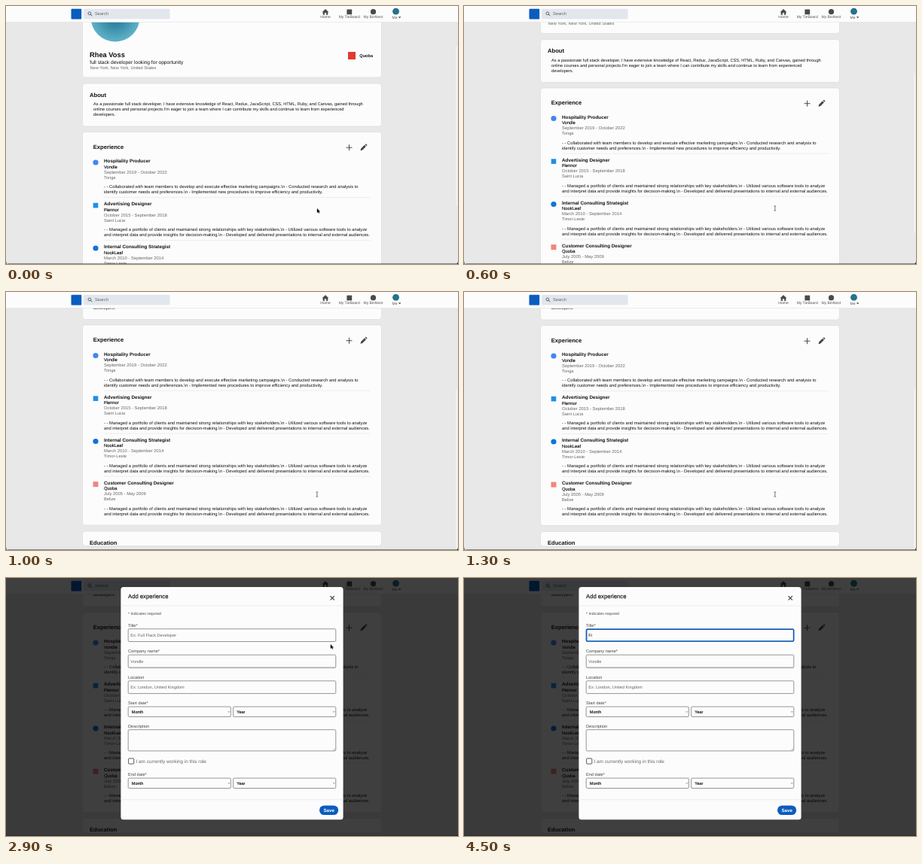
These frames come from a looping animation (600 by 343 pixels, 5 s). An HTML page:

```html
<!DOCTYPE html>
<html lang="en">
<head>
<meta charset="utf-8">
<title>Profile page</title>
<style>
  @property --s { syntax: "<number>"; inherits: true; initial-value: 0; }
  html, body { margin: 0; width: 100%; height: 100%; overflow: hidden; background: #e8e8e8; }
  svg { display: block; width: 600px; height: 343px; animation: scroll 5s step-end infinite; }
  text {
    font-family: "Liberation Sans", Arial, sans-serif;
    text-rendering: geometricPrecision;
    fill: #111;
    white-space: pre;
  }
  .b { font-weight: 700; }
  .m { stroke: #111; stroke-width: .14; }
  .g { fill: #666; }
  .l { fill: #444; }
  .c { text-anchor: middle; fill: #555; }
  .w { fill: #fff; }
  .card { fill: #fcfcfc; stroke: #d9d9d9; stroke-width: .6; }
  .rule { stroke: #e2e2e2; stroke-width: .6; }
  .field { fill: #fcfcfc; stroke: #6a6a6a; stroke-width: .7; }
  .line { fill: none; stroke: #4a4a4a; }
  #page { transform: translateY(calc(var(--s) * -1px)); }
  #thumb { transform: translateY(calc(var(--s) * .62px)); }
  #pointer { animation: move 5s step-end infinite; }
  #caret { animation: caret 5s step-end infinite; }

  @keyframes scroll {
    0% { --s: 0 } 2% { --s: 18 } 4% { --s: 33 } 6% { --s: 43 } 8% { --s: 48 }
    12% { --s: 58.5 } 14% { --s: 80 } 16% { --s: 101 } 18% { --s: 115 }
    20% { --s: 123.5 } 22% { --s: 124 } 24% { --s: 123.5 } 26% { --s: 123 }
    28%, 100% { --s: 122 }
  }
  @keyframes move {
    0% { transform: translate(412.8px, 269px) }
    34% { transform: translate(414px, 258px) }
    36% { transform: translate(424px, 215px) }
    38% { transform: translate(439px, 138px) }
    40% { transform: translate(452px, 72px) }
    42% { transform: translate(455px, 66px) }
    52% { transform: translate(452px, 70px) }
    54% { transform: translate(444px, 78px) }
    56% { transform: translate(435px, 85px) }
    58% { transform: translate(430.7px, 88px) }
    64% { transform: translate(420px, 87px) }
    68% { transform: translate(370px, 82px) }
    70% { transform: translate(300px, 79px) }
    72% { transform: translate(245px, 77px) }
    74%, 100% { transform: translate(215px, 76px) }
  }
  @keyframes caret {
    0% { transform: translateX(165.4px) }
    84% { transform: translateX(168.9px) }
    90%, 100% { transform: translateX(170.2px) }
  }
</style>
</head>
<body>
<script>
const text = (x, y, size, str, cls = "") =>
  `<text x="${x}" y="${y}" font-size="${size}" class="${cls}">${str}</text>`;
const rect = (x, y, w, h, r = 0, attrs = "") =>
  `<rect x="${x}" y="${y}" width="${w}" height="${h}" rx="${r}" ${attrs}/>`;
const dot = (x, y, r, fill, attrs = "") =>
  `<circle cx="${x}" cy="${y}" r="${r}" fill="${fill}" ${attrs}/>`;
const path = (d, attrs = "") => `<path d="${d}" ${attrs}/>`;
const card = (top, bottom) => rect(101.5, top, 397, bottom - top, 4, 'class="card"');

// Visible only inside the given [from, to) ranges, in percent of the loop
const windows = {
  arrow: [[0, 6], [36, 40], [52, 66]],
  beam: [[6, 36], [66, 84]],
  hand: [[40, 52]],
  hover: [[40, 50]],
  modal: [[50, 100]],
  hint: [[50, 84]],
  focus: [[78, 100]],
  typedF: [[84, 100]],
  typedI: [[90, 100]]
};
const css = Object.entries(windows).map(([name, ranges]) => {
  const keys = ranges.map(([a, b]) =>
    `${a}% { visibility: visible } ${b}% { visibility: ${b < 100 ? "hidden" : "visible"} }`).join(" ");
  const start = ranges[0][0] ? "0% { visibility: hidden }" : "";
  return `@keyframes ${name} { ${start} ${keys} }
    .${name} { visibility: hidden; animation: ${name} 5s step-end infinite; }`;
}).join("\n");
document.head.insertAdjacentHTML("beforeend", `<style>${css}</style>`);

const managed = [
  "- - Managed a portfolio of clients and maintained strong relationships with key stakeholders.\\n - Utilized various software tools to analyze",
  "and interpret data and provide insights for decision-making.\\n - Developed and delivered presentations to internal and external audiences."
];
const jobs = [
  ["Hospitality Producer", "Vondle", "September 2019 - October 2022", "Tonga", [
    "- - Collaborated with team members to develop and execute effective marketing campaigns.\\n - Conducted research and analysis to",
    "identify customer needs and preferences.\\n - Implemented new procedures to improve efficiency and productivity."],
    dot(119, 208, 3.6, "#4285f4")],
  ["Advertising Designer", "Flennor", "October 2015 - September 2018", "Saint Lucia", managed,
    rect(115.7, 204.8, 6.6, 6.6, 0, 'fill="#1d8fe8"')],
  ["Internal Consulting Strategist", "NookLeaf", "March 2010 - September 2014", "Timor-Leste", managed,
    dot(119, 208, 3.6, "#1072dd")],
  ["Customer Consulting Designer", "Quoba", "July 2005 - May 2009", "Belize", managed,
    rect(115.5, 204.6, 7, 7, 0, 'fill="#ee8680"')]
];
const job = ([title, firm, dates, place, lines, mark], i) => `<g transform="translate(0 ${i * 57})">
  ${mark}
  ${text(130, 208.3, 6.3, title, "b")}
  ${text(130, 215.6, 5.85, firm, "m")}
  ${text(130, 222.5, 5.85, dates, "g")}
  ${text(130, 229.5, 5.7, place, "g")}
  ${lines.map((s, k) => text(130, 242 + 7 * k, 5.8, s)).join("")}
  ${i < 3 ? path("M130 254.6H484", 'class="rule"') : ""}
</g>`;

const about = [
  "As a passionate full stack developer, I have extensive knowledge of React, Redux, JavaScript, CSS, HTML, Ruby, and Canvas, gained through",
  "online courses and personal projects.I'm eager to join a team where I can contribute my skills and continue to learn from experienced",
  "developers."
];
const page = `<g id="page">
  ${card(-60, 95)}
  ${dot(145, 15, 32.5, "url(#sea)")}
  ${text(111, 68, 9.3, "Rhea Voss", "b")}
  ${text(111.3, 76.7, 6.65, "full stack developer looking for opportunity")}
  ${text(111.5, 83.6, 5.65, "New York, New York, United States", "g")}
  ${rect(454, 61, 10, 10, 0, 'fill="#df3b30"')}
  ${text(469.3, 68.2, 5.6, "Quoba", "b")}
  ${card(103, 160)}
  ${text(111, 120.7, 7.65, "About", "b")}
  ${about.map((s, k) => text(116, 132 + 7 * k, 5.67, s)).join("")}
  ${card(167.5, 433.5)}
  ${text(115.8, 189.7, 7.6, "Experience", "b")}
  ${dot(455.5, 188, 9.6, "#dddddd", 'class="hover"')}
  ${path("M451.5 188.2h8M455.5 184.2v8", 'class="line"')}
  ${path("M-4 4l.7-2.8L1.4-3.4l2 2L-1.3 3.3zM2.1-4l.7-.7q.5-.4.9 0l1 1q.4.4 0 .9l-.7.7z",
    'transform="translate(474.5 188.2)" fill="#444"')}
  ${jobs.map(job).join("")}
  ${card(441.5, 461)}
  ${text(111, 459, 7.55, "Education", "b")}
</g>`;

const header = `${rect(0, 0, 600, 21.5, 0, 'fill="#fcfcfc"')}
  ${path("M0 21.5H600", 'stroke="#dcdcdc" stroke-width=".5"')}
  ${rect(86.5, 3.7, 13.7, 13.7, 1, 'fill="#0a5cbf"')}
  ${rect(103, 3.7, 114.5, 13.6, 1.5, 'fill="#e1e7ed"')}
  ${path("M112.4 11.2l2 2", 'class="line"')}
  <circle cx="110.9" cy="9.8" r="1.9" class="line" stroke-width=".8"/>
  ${text(118, 12.4, 5.7, "Search", "g")}
  ${path("M419.6 8.3L424 4l4.4 4.3h-1.1V11.7h-2.2V8.9h-2.2v2.8h-2.2V8.3z", 'fill="#4a4a4a"')}
  ${rect(452.4, 4.4, 6.8, 6.8, .5, 'fill="#4a4a4a"')}
  ${dot(487.5, 7.7, 3.6, "#4a4a4a")}
  ${dot(517.5, 7.2, 4.4, "#24728c")}
  ${text(424, 16.2, 5, "Home", "c")}
  ${text(455.7, 16.2, 5, "My TieBoard", "c")}
  ${text(487.3, 16.2, 5, "My BinNest", "c")}
  ${text(516, 16.8, 5, "Me", "c")}
  ${path("M520.8 14.2h3.6l-1.8 2z", 'fill="#444"')}`;

const field = (y, h) => rect(162.2, y, 275.6, h, 1.4, 'class="field"');
const select = (x, y, label) => `${rect(x, y, 136.2, 13.4, 1.4, 'class="field"')}
  ${text(x + 4.6, y + 8.7, 5.55, label, "m")}
  ${path(`M${x + 132.6} ${y + 6.1}l1.2 1.3 1.2-1.3`, 'class="line" stroke-width=".6"')}`;
const dates = y => select(162.2, y, "Month") + select(301.6, y, "Year");
const label = (y, str) => text(162, y, 5.65, str, "l");

const modal = `<g class="modal">
  ${rect(0, 0, 600, 343, 0, 'fill="#000" fill-opacity=".75"')}
  ${rect(152.4, 12, 295.2, 309.2, 3.5, 'fill="#fcfcfc"')}
  ${text(162, 27.4, 7.7, "Add experience", "m")}
  ${path("M430.5 24l5.4 5.4M435.9 24l-5.4 5.4", 'class="line" stroke-width="1.2"')}
  ${path("M152.4 37H447.6M152.4 294.7H447.6", 'class="rule"')}
  ${text(162, 48.7, 5.1, "* Indicates required", "l")}
  ${label(64.7, "Title*")}
  ${field(67.7, 16.8)}
  ${rect(162.6, 68.2, 275, 15.8, 1.2, 'class="focus" fill="#fcfcfc" stroke="#0a5cbf" stroke-width="1.6"')}
  ${text(165.2, 78, 5.63, "Ex: Full Flack Developer", "g hint")}
  ${text(165.2, 78, 5.63, 'F<tspan class="typedI">i</tspan>', "typedF")}
  <path id="caret" class="focus" d="M0 72.8v6.6" stroke="#111" stroke-width=".6"/>
  ${label(99.3, "Company name*")}
  ${rect(162.4, 103, 275.6, 17.2, 1.6, 'fill="#d8d8d8"')}
  ${field(102.2, 16.8)}
  ${text(165.2, 112.6, 5.63, "Vondle", "g")}
  ${label(133.8, "Location")}
  ${field(136.8, 16.8)}
  ${text(165.2, 147.2, 5.63, "Ex: London, United Kingdom", "g")}
  ${label(168.2, "Start date*")}
  ${dates(171.1)}
  ${label(198.8, "Description")}
  ${field(201.7, 28.2)}
  ${path("M434.4 229l2.6-2.6M436 229l1-1", 'class="line" stroke-width=".4"')}
  ${rect(162.6, 239.9, 7.2, 7.2, .8, 'class="line" stroke-width=".9"')}
  ${text(172.5, 245.8, 6.4, "I am currently working in this role", "g")}
  ${label(263.3, "End date*")}
  ${dates(266.1)}
  ${rect(416, 302.4, 25.2, 12.6, 6.3, 'fill="#0a5cbf"')}
  ${text(421.4, 311, 6.2, "Save", "b w")}
</g>`;

const pointer = `<g id="pointer">
  ${path("M0 0v6l1.4-1.2.9 2 1-.4-.9-2h1.8z",
    'class="arrow" fill="#000" stroke="#fff" stroke-width=".5" paint-order="stroke"')}
  ${path("M-1.3-3.3Q0-3.3 0-2.5V2.5Q0 3.3-1.3 3.3M1.3-3.3Q0-3.3 0-2.5M0 2.5Q0 3.3 1.3 3.3",
    'class="beam" fill="none" stroke="#333" stroke-width=".7"')}
  ${path("M-1.2 1V-2.6q.6-1 1.2 0V-.4l2.4.6q.7.2.6 1L2.5 4H-.8L-2.9 1.4q0-1 1-.8z",
    'class="hand" fill="#fff" stroke="#222" stroke-width=".6"')}
</g>`;

document.body.innerHTML = `<svg viewBox="0 0 600 343">
  <defs><radialGradient id="sea">
    <stop offset=".2" stop-color="#2a7f9b"/><stop offset="1" stop-color="#5fb2c8"/>
  </radialGradient></defs>
  ${rect(0, 0, 600, 343, 0, 'fill="#e8e8e8"')}
  ${page}
  ${rect(597, 53, 2.4, 213, 1.2, 'id="thumb" fill="#f1f1f1"')}
  ${header}
  ${modal}
  ${path("M0 339v4h4A4 4 0 0 1 0 339M600 339v4h-4A4 4 0 0 0 600 339M0 342.6h600v.4H0z", 'fill="#222"')}
  ${pointer}
</svg>`;
</script>
</body>
</html>
```
